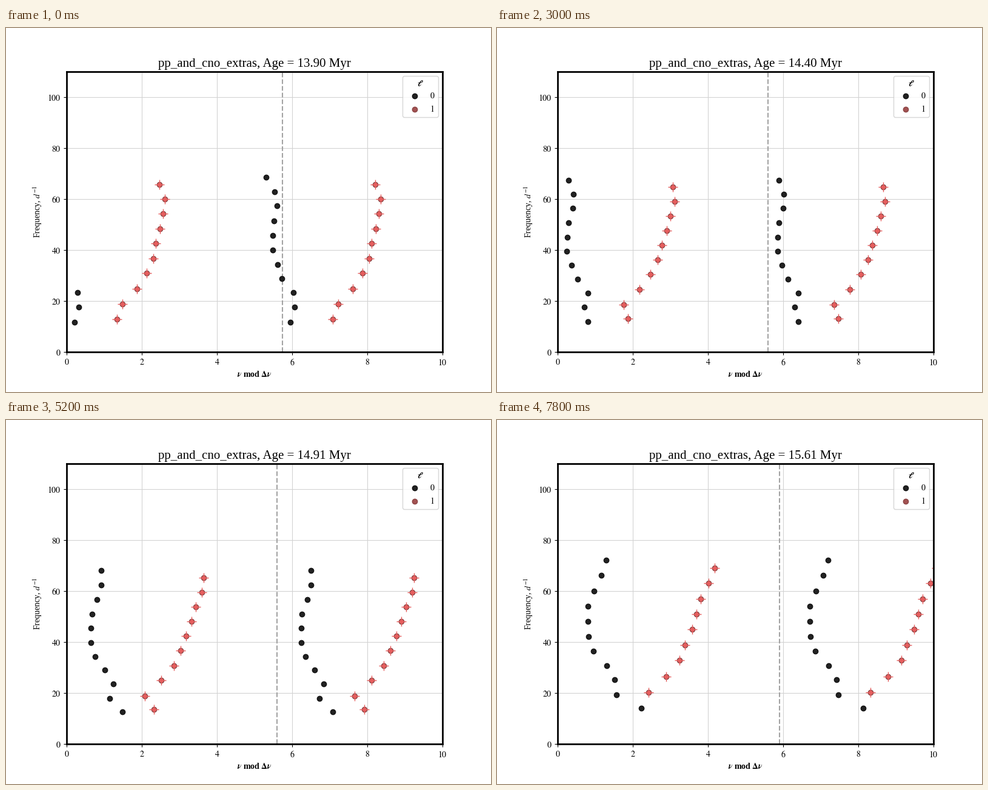
Animation of 800 by 600 pixels, one loop 8 s. Source, as a matplotlib script:

```python
import numpy as np
import matplotlib.pyplot as plt
from matplotlib.animation import FuncAnimation

plt.rcParams.update({
    "font.family": "Liberation Serif",
    "mathtext.fontset": "stix",
    "font.size": 10,
    "axes.linewidth": 2,
})

FRAMES = 40
PX = 62  # pixels per unit on the x axis
RED = "#e65e5e"
LOW_DIPOLE_AGE = 15.46  # the lowest dipole mode is lost beyond this age


def age_at(t):
    return np.interp(t, [0, 6, 15, 22, 30, 34, 39],
                     [13.90, 14.08, 14.40, 14.71, 15.10, 15.34, 15.61])


def progress(age):
    return (age - 13.90) / 1.71


def spacing(a):
    """Large separation: shrinks at first, then grows again."""
    return (356 - 40.8 * a + 30.7 * a**2 + 20.2 * a**3) / PX


class Ridge:
    """Modes of one degree, moving from a start pose to an end pose.

    Poses are offsets nu - n * spacing in pixels, from order n = 2 upward.
    """

    def __init__(self, start, end, bend):
        self.start = np.array(start, float)
        self.move = np.array(end) - self.start
        self.row = np.arange(len(start))
        self.bend = bend(self.row)

    def echelle(self, a, first=0):
        """Folded frequencies, with a second copy one spacing to the right."""
        arch = a * (1 - a)
        ease = a + 0.3 * arch * (2 * a - 1)
        offset = (self.start + self.move * ease + self.bend * arch) / PX
        gap = spacing(a)
        nu = ((self.row + 2) * gap + offset)[first:]
        x = nu % gap
        return np.append(x, x + gap), np.append(nu, nu)


radial = Ridge(
    start=[13, 20, 18, -1, -8, -16, -16, -14, -9, -13, -27],
    end=[138, 97, 94, 81, 59, 51, 50, 50, 60, 72, 80],
    bend=lambda row: np.where(row < 2, 18, 50 + 3 * row))
dipole = Ridge(
    start=[83, 92, 116, 132, 143, 147, 154, 159, 162, 153],
    end=[161, 150, 179, 201, 210, 222, 229, 236, 249, 259],
    bend=lambda row: 4.5 * row + 60 * 0.05**row)


def ticks(stop, step):
    values = range(0, stop + 1, step)
    return values, [f"${v}$" for v in values]


fig, ax = plt.subplots(figsize=(8, 6), dpi=100)
ax.set(xlim=(0, 10), ylim=(0, 110))
ax.set_xticks(*ticks(10, 2))
ax.set_yticks(*ticks(100, 20))
ax.set_axisbelow(True)
ax.grid(color="#d3d3d3", lw=0.8)
ax.set_xlabel(r"$\boldsymbol{\nu}$ mod $\boldsymbol{\Delta\nu}$", weight="bold")
ax.set_ylabel(r"Frequency, $\boldsymbol{d^{-1}}$")
title = ax.set_title("", fontsize=15)

fold = ax.axvline(0, color="#a3a3a3", ls="--", lw=1.5)
black, = ax.plot([], [], "o", color="#222222", mec="#141414", label="$0$")
ring, = ax.plot([], [], "o", color="#a35252", mec="#8c4646", label="$1$")
cross, = ax.plot([], [], "+", color=RED, ms=11.5, mew=1)
core, = ax.plot([], [], "o", color=RED, ms=4.9, mew=0)
ax.legend(title=r"$\boldsymbol{\ell}$", loc="upper right")


def draw(t):
    age = age_at(t)
    a = progress(age)
    fold.set_xdata([spacing(a)] * 2)
    black.set_data(*radial.echelle(a))
    points = dipole.echelle(a, first=int(age > LOW_DIPOLE_AGE))
    for part in (ring, cross, core):
        part.set_data(*points)
    title.set_text(f"pp_and_cno_extras, Age = {age:.2f} Myr")
    return fold, black, ring, cross, core, title


anim = FuncAnimation(fig, draw, frames=FRAMES, interval=200,
                     init_func=lambda: draw(0), repeat=True, repeat_delay=0)
plt.show()
```
